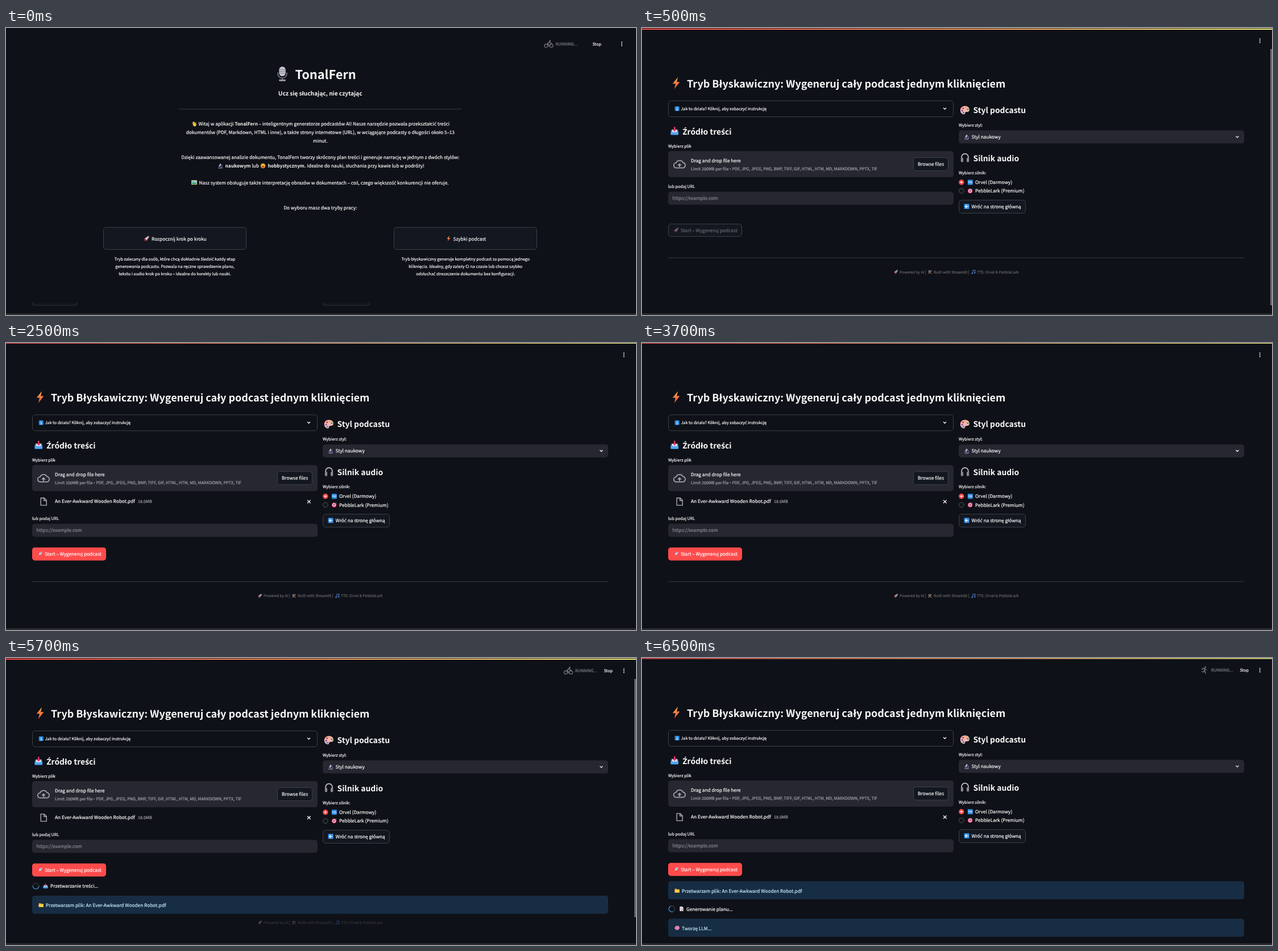
An HTML page for the animation above (8 s loop, 1108 by 506 pixels).

```html
<!DOCTYPE html>
<html lang="pl">
<head>
<meta charset="utf-8">
<title>Generator podcastów</title>
<style>
html, body { margin: 0; width: 100%; height: 100%; overflow: hidden; background: #0e1117; }
svg { display: block; width: 100%; height: 100%; }
text {
  font: 400 8.25px "Noto Sans CJK JP", "Noto Sans CJK SC", "Open Sans", "Noto Sans", sans-serif;
  color: #fafafa; fill: currentColor; stroke: currentColor; stroke-width: .2px;
  text-rendering: geometricPrecision; white-space: pre;
}
.o { font-family: "Open Sans", "Noto Sans", sans-serif; }
.b, .h1, .h2, .h3, .sub { font-weight: 700; stroke: none; }
.h1 { font-size: 21.7px; }
.h2 { font-size: 17.95px; }
.h3 { font-size: 13.85px; }
.sub { font-size: 10.1px; }
.s { font-size: 7.22px; }
.xs { font-size: 6.59px; color: #636468; }
.m { text-anchor: middle; }
.g { color: #a3a4a9; }
.ph { color: #8a8b90; }
.run { color: #7f8186; }
.off { color: #65676c; }
.note { color: #c7ebff; }
.line { fill: none; stroke: #fafafa; stroke-width: 1.3; }
.btn { fill: #131720; stroke: #3d4046; }
.frame { fill: none; stroke: #3d4046; }
.field { fill: #262730; }
.info { fill: #172d43; }
.red { fill: #ff4b4b; }

/* opaque scenes stack up, each one cutting in at its own time */
.scene { animation: 8s step-end infinite; }
#upload { animation-name: upload; }
#ready { animation-name: ready; }
#reading { animation-name: reading; }
#planning { animation-name: planning; }
@keyframes upload { 0% { visibility: hidden } 6.25%, to { visibility: visible } }
@keyframes ready { 0% { visibility: hidden } 31.25%, to { visibility: visible } }
@keyframes reading { 0% { visibility: hidden } 56.25%, to { visibility: visible } }
@keyframes planning { 0% { visibility: hidden } 81.25%, to { visibility: visible } }
</style>
</head>
<body>
<svg viewBox="0 0 1108 506"></svg>
<script>
const APP = 'TonalFern', FREE = 'Orvel', PAID = 'PebbleLark';
const FILE = 'An Ever-Awkward Wooden Robot.pdf';

// Icons live on a 20 x 20 grid
const icons = {
  bolt: '<path d="M13 0 4 11h5L7 20 16 8h-5z" fill="url(#fire)"/>',
  mic: `<rect x="5.6" y="0" width="8.8" height="13" rx="4.4" fill="#c8c4d0"/>
    <path d="M6 4h8M6 6.5h8M6 9h8" stroke="#8b8399" stroke-width=".9"/>
    <path d="M4 8v2a6 5.5 0 0 0 12 0V8M10 15.5V18" fill="none" stroke="#75707f" stroke-width="1.4"/>
    <rect x="5.5" y="17.5" width="9" height="2.3" rx="1" fill="#a19aad"/>`,
  inbox: `<path d="M3 6h14l2 5v7q0 1.5-1.5 1.5h-15Q1 19.5 1 18v-7z" fill="#2f86dd"/>
    <path d="M4 7h12v6H4z" fill="#dfe7f4"/><path d="M1 12h5l1.5 2h5L14 12h5v6H1z" fill="#55a9f2"/>
    <path d="M8.3 0h3.4v6H15l-5 5.5L5 6h3.3z" fill="#e9355a"/>`,
  palette: `<path d="M10 1C4 1 0 5 0 10.5S4.500 19 8 19c3 0 1.5-3 3-4.5s8 .5 8.5-5S15 1 10 1z" fill="#f2b8ae"/>
    <circle cx="6" cy="6" r="2" fill="#e2385a"/><circle cx="11.5" cy="4.5" r="1.9" fill="#f4a73b"/>
    <circle cx="16" cy="8" r="1.9" fill="#35a66b"/><circle cx="4" cy="11" r="1.9" fill="#7d4bc4"/>
    <circle cx="7" cy="15.5" r="1.9" fill="#3285e0"/>`,
  info: '<rect width="20" height="20" rx="3" fill="#2b8be6"/><path d="M7.5 8.5H11V16m-4 0h7M10 3v3" fill="none" stroke="#fff" stroke-width="2.2"/>',
  scope: `<path d="M9 1l5 3-5 9-5-3z" fill="#b9b5cb"/><path d="M13 7c6 3 5 9 0 11" fill="none" stroke="#7772a3" stroke-width="2.4"/>
    <path d="M2 13h9" stroke="#6ba4dd" stroke-width="2"/><path d="M2 18.5h16" stroke="#8f8aae" stroke-width="3"/>`,
  phones: `<path d="M3 13V9a7 7.5 0 0 1 14 0v4" fill="none" stroke="#c2bfca" stroke-width="2"/>
    <rect x="1.5" y="10" width="5" height="9" rx="2" fill="#8b8794"/><rect x="13.5" y="10" width="5" height="9" rx="2" fill="#8b8794"/>`,
  free: '<rect width="20" height="20" rx="3" fill="#2d8de8"/><path d="M3 13V7h3M3 10h2.5M8 13V7h2v3H8l2.5 3M15 7h-2.5v6H15m-2.5-3H15M18.5 7H17v6h1.5" fill="none" stroke="#fff" stroke-width="1.2"/>',
  dart: `<circle cx="9.5" cy="10.5" r="9.5" fill="#e3365b"/><circle cx="9.5" cy="10.5" r="6.5" fill="#f4e4ea"/>
    <circle cx="9.5" cy="10.5" r="4" fill="#e3365b"/><path d="M9.5 10.5 18 2" stroke="#4b9be8" stroke-width="2.4"/>`,
  back: '<rect width="20" height="20" rx="3" fill="#3392ea"/><path d="M17 10H5m5-5.5L4.5 10l5.5 5.5" fill="none" stroke="#fff" stroke-width="2.6"/>',
  rocket: `<path d="M7 7 2 9l-1 4 5-1zm6 6-2 5-4 1 1-5z" fill="#dc3d58"/>
    <path d="M19 1c-6 0-11 4-14 10l4 4c6-3 10-8 10-14z" fill="#d8d5e0"/><path d="M19 1l-5 .9L18.1 6z" fill="#e3415b"/>
    <circle cx="13" cy="7" r="2.1" fill="#4a93d4"/><path d="M5 13.5 1 19l5.5-4z" fill="#f9a63a"/>`,
  tools: `<path d="M3 17 15 5" stroke="#b9b7c0" stroke-width="3"/><path d="M6 6l11 12" stroke="#d98a58" stroke-width="3"/>
    <path d="M2 7l6-6 3 3-6 6z" fill="#9a98a5"/><path d="M13 2l1 4 4 1 1-4-3 1z" fill="#b9b7c0"/>`,
  tune: `<path d="M7 16V3l11-2v13M7 6l11-2" fill="none" stroke="#5c83d6" stroke-width="2.2"/>
    <circle cx="4.5" cy="16" r="3.5" fill="#5c83d6"/><circle cx="15.5" cy="14" r="3.5" fill="#5c83d6"/>`,
  wave: `<path d="M5 3l8 9M9 2l6 9M4 8l7 7M16 7v7" stroke="#ffc83d" stroke-width="3" stroke-linecap="round"/>
    <ellipse cx="12" cy="14" rx="6" ry="5.5" fill="#ffbd38"/><path d="M1 14l3 4M15 1l3 3" stroke="#4aa3e5" stroke-width="1.2"/>`,
  smile: `<circle cx="10" cy="10" r="9.5" fill="#ffb72e"/><path d="M5 8q1.5-2 3 0m4 0q1.5-2 3 0" fill="none" stroke="#60351d" stroke-width="1.4"/>
    <path d="M5 11.5h10a5 5 0 0 1-10 0z" fill="#8a2c34"/><circle cx="3.5" cy="11.5" r="2" fill="#f5734a"/><circle cx="16.5" cy="11.5" r="2" fill="#f5734a"/>`,
  photo: `<rect y="2" width="20" height="16" rx="1" fill="#e3bd72"/><path d="M2 4h16v12H2z" fill="#78c8ed"/>
    <path d="M2 13l5-5 4 4 3-2 4 3v3H2z" fill="#37a263"/><circle cx="14" cy="7" r="1.7" fill="#ffe36a"/>`,
  folder: '<path d="M1 3h7l2 2h9v13H1z" fill="#e79b23"/><path d="M1 7h18v11H1z" fill="#ffcd49"/>',
  memo: `<path d="M3 1h10l4 4v14H3z" fill="#ece8f2"/><path d="M5.5 6h6M5.5 9h8M5.5 12h5" stroke="#9b93ac" stroke-width="1.2"/>
    <path d="M8 17 17 8l2 2-9 9z" fill="#e8794b"/>`,
  brain: `<path d="M3 14C-1 11 1 6 4 5c1-4 6-5 8-3 4-1 7 3 7 6 2 4-1 7-4 7-1 4-4 5-5 2-3 1-6 0-7-3z" fill="#f187b4"/>
    <path d="M4 9q3-2 5 1m0-6q0 3 4 3m-6 7q4 1 5-2m3-3q-2 0-2 2" fill="none" stroke="#c24f86" stroke-width="1.3"/>`,
  bike: `<g fill="none" stroke="#7d7f84" stroke-width="1.4"><circle cx="4" cy="14" r="3.8"/><circle cx="16" cy="14" r="3.8"/>
    <path d="M10 16v-4L7 9l4-3.5L13.5 8H17" stroke-width="1.8"/></g><circle cx="13" cy="3.2" r="1.8" fill="#7d7f84"/>`,
  runner: `<path d="M4 9V6l5-1.5 2 .5-1.5 6 3 3v5.5M9.5 11 8 15l-5-1M11 5l2 3.5 4 1" fill="none" stroke="#7d7f84" stroke-width="2"/>
    <circle cx="13" cy="2" r="1.9" fill="#7d7f84"/>`,
  cloud: `<path d="M5.500 16.5H5A4 4 0 0 1 4.5 8.5 6 6 0 0 1 15.5 8 4.3 4.3 0 0 1 15.5 16.5z" fill="none" stroke="#a3a4a9" stroke-width="1.6"/>
    <path d="M10 9 6.5 12.5H9V15h2v-2.5h2.5z" fill="#a3a4a9"/>`,
  file: '<path d="M4 2h7.5l5 5v11H4zM11 2v5.5h5.5" fill="none" stroke="#b2b3b7" stroke-width="1.7"/>',
};

const icon = (name, cx, cy, size = 9, opacity = 1) =>
  `<g transform="translate(${cx - size / 2} ${cy - size / 2}) scale(${size / 20})" opacity="${opacity}">${icons[name]}</g>`;
// The CJK face lacks Polish letters and has full-width dashes and bullets
const text = (x, y, str, cls = '') =>
  `<text x="${x}" y="${y}" class="${cls}">${str.replace(/[–•ąćęłńśźżŹ]/g, '<tspan class="o">$&</tspan>')}</text>`;
const bold = str => `<tspan class="b">${str}</tspan>`;
const box = (x, y, w, h, cls) => `<rect x="${x}" y="${y}" width="${w}" height="${h}" rx="4.6" class="${cls}"/>`;
const rule = (x1, x2, y) => `<path d="M${x1} ${y}H${x2}" stroke="#383b41"/>`;
const chevron = (x, y) => `<path d="M${x - 2.5} ${y - 1.2}l2.5 2.5 2.5-2.5" class="line"/>`;
const lines = (x, y, step, cls, rows) => rows.map((row, i) => text(x, y + i * step, row, cls)).join('');
const dots = (x, y) => [-3, 0, 3].map(d => `<circle cx="${x}" cy="${y + d}" r="1" fill="#fafafa"/>`).join('');
const scene = (id, body) =>
  `<g class="scene" id="${id}"><rect width="1108" height="506" fill="#0e1117"/>${body}</g>`;

const status = (x, y, who, stopX) => icon(who, x, y, who == 'bike' ? 15.5 : 13)
  + text(x + 12, y + 2.8, 'RUNNING...', 's run') + text(stopX, y + 2.8, 'Stop', 's');
const spinner = (y, turn) => `<g transform="rotate(${turn} 52.5 ${y})" fill="none" stroke-width="1.5">
  <circle cx="52.5" cy="${y}" r="5.3" stroke="#32353c"/>
  <path d="M47.2 ${y}a5.3 5.3 0 0 0 10.6 0" stroke="#2b7fc9"/></g>`;
const busy = (y, turn, name, label) => spinner(y, turn) + icon(name, 69.5, y) + text(78, y + 3.3, label);
const notice = (y, name, label) =>
  box(46, y, 1013, 32, 'info') + icon(name, 61.7, y + 16.5) + text(70, y + 20, label, 'note');

const footer = (y, opacity = 1) => `<g opacity="${opacity}">`
  + icon('rocket', 446.5, y - 2.7, 8, .8) + text(453, y, 'Powered by AI |', 'xs')
  + icon('tools', 506.3, y - 2.7, 8, .8) + text(513, y, 'Built with Streamlit |', 'xs')
  + icon('tune', 582.8, y - 2.7, 8, .8) + text(589, y, `TTS: ${FREE} &amp; ${PAID}`, 'xs') + '</g>';

const home = () => status(954.5, 28.2, 'bike', 1031.5) + dots(1083, 28)
  + icon('mic', 486, 81, 26) + text(508.5, 89.5, APP, 'h1')
  + text(552.7, 119, 'Ucz się słuchając, nie czytając', 'sub m') + rule(304, 801, 143)
  + icon('wave', 331, 169.2)
  + text(338.5, 172.2, `Witaj w aplikacji ${bold(APP)} – inteligentnym generatorze podcastów AI! Nasze narzędzie pozwala przekształcić treści`)
  + lines(552.8, 187, 14.8, 'm', [
    'dokumentów (PDF, Markdown, HTML i inne), a także strony internetowe (URL), w wciągające podcasty o długości około 5–13',
    'minut.', '',
    `Dzięki zaawansowanej analizie dokumentu, ${APP} tworzy skrócony plan treści i generuje narrację w jednym z dwóch stylów:`])
  + icon('scope', 377, 243) + text(385.5, 246.2, `${bold('naukowym')} lub`)
  + icon('smile', 452, 243) + text(460.5, 246.2, `${bold('hobbystycznym.')} Idealne do nauki, słuchania przy kawie lub w podróży!`)
  + icon('photo', 331, 272.2, 10)
  + text(339.5, 275.7, 'Nasz system obsługuje także interpretację obrazów w dokumentach – coś, czego większość konkurencji nie oferuje.')
  + text(552.8, 320, 'Do wyboru masz dwa tryby pracy:', 'm')
  + box(171.5, 351.5, 251, 39, 'btn') + icon('rocket', 247.2, 371.3, 10) + text(256, 374.5, 'Rozpocznij krok po kroku')
  + box(682.5, 351.5, 251, 39, 'btn') + icon('bolt', 778.3, 371.3, 10) + text(786.5, 374.5, 'Szybki podcast')
  + lines(297, 409.7, 13, 's m', [
    'Tryb zalecany dla osób, które chcą dokładnie śledzić każdy etap',
    'generowania podcastu. Pozwala na ręczne sprawdzenie planu,',
    'tekstu i audio krok po kroku – idealne do korekty lub nauki.'])
  + lines(808.3, 409.7, 13, 's m', [
    'Tryb błyskawiczny generuje kompletny podcast za pomocą jednego',
    'kliknięcia. Idealny, gdy zależy Ci na czasie lub chcesz szybko',
    'odsłuchać streszczenie dokumentu bez konfiguracji.'])
  + [[46.5, 79], [557.5, 82]].map(([x, w]) =>
    `<path d="M${x} 484v1q0 4 4 4h${w - 8}q4 0 4-4v-1" fill="#12161e" stroke="#30333a"/>`).join('');

function page({ shift = 0, barTop = 1, barHeight = 2, barOpacity = 1, picked, thumb, extra }) {
  const url = picked ? 32 : 0, start = picked ? 362.2 : 345.2;
  return `<rect y="${barTop}" width="1108" height="${barHeight}" fill="url(#top)" opacity="${barOpacity}"/>`
    + `<g transform="translate(0 ${shift})">` + dots(1086.7, 22.5)
    + icon('bolt', 60, 97.3, 21) + text(79, 104.5, 'Tryb Błyskawiczny: Wygeneruj cały podcast jednym kliknięciem', 'h2')
    + box(46.5, 128.5, 501, 28, 'frame')
    + icon('info', 61.7, 142.3, 8) + text(68.5, 145.2, 'Jak to działa? Kliknij, aby zobaczyć instrukcję', 's') + chevron(532.5, 142)
    + icon('inbox', 57.3, 181.7, 15) + text(71.5, 187.5, 'Źródło treści', 'h3')
    + text(46, 211, 'Wybierz plik', 's') + box(46, 217, 502, 46, 'field')
    + icon('cloud', 66, 239.5, 22) + text(86, 237, 'Drag and drop file here')
    + text(86, 251, 'Limit 200MB per file • PDF, JPG, JPEG, PNG, BMP, TIFF, GIF, HTML, HTM, MD, MARKDOWN, PPTX, TIF', 's g')
    + box(477.5, 228.5, 61, 23, 'btn') + text(508, 243.2, 'Browse files', 'm')
    + (picked ? icon('file', 66, 281.5, 16) + text(86, 284.2, FILE) + text(232, 284.2, '18.0MB', 's g')
      + '<path d="M530 278.7l5.6 5.6m0-5.6l-5.6 5.6" class="line"/>' : '')
    + text(46, 282.2 + url, 'lub podaj URL', 's') + box(46, 288.6 + url, 502, 23, 'field')
    + text(53.5, 303.3 + url, 'https://example.com', 'ph')
    + (picked ? box(46, start, 130, 23, 'red') : box(46.5, start + .3, 129, 22, 'btn'))
    + icon('rocket', 60, start + 11.3, 9.5, picked ? 1 : .45)
    + text(68, start + 14.5, 'Start – Wygeneruj podcast', picked ? '' : 'off')
    + icon('palette', 568, 144.8, 16.5) + text(582.5, 150.3, 'Styl podcastu', 'h3')
    + text(557, 174, 'Wybierz styl:', 's') + box(557, 180.5, 502, 23, 'field')
    + icon('scope', 571, 192) + text(579.5, 195.3, 'Styl naukowy') + chevron(1047, 191.8)
    + icon('phones', 568, 228.8, 17) + text(582.5, 234.5, 'Silnik audio', 'h3')
    + text(557, 257.5, 'Wybierz silnik:', 's')
    + '<circle cx="561.8" cy="272" r="4.7" class="red"/><circle cx="561.8" cy="272" r="1.7" fill="#fafafa"/>'
    + icon('free', 577.3, 272) + text(586, 275.3, `${FREE} (Darmowy)`)
    + '<circle cx="561.8" cy="287.2" r="4.3" fill="#12151c" stroke="#53565c"/>'
    + icon('dart', 577.3, 287) + text(586, 290.4, `${PAID} (Premium)`)
    + box(557.5, 303.5, 117, 23, 'btn') + icon('back', 571, 314.6) + text(579.5, 318, 'Wróć na stronę główną')
    + extra + '</g>'
    + (thumb ? `<rect x="1105" y="37" width="3" height="${thumb - 37}" fill="#64666c"/>` : '');
}

const reading = `Przetwarzam plik: ${FILE}`;

document.querySelector('svg').innerHTML = `<defs>
  <linearGradient id="top"><stop stop-color="#ff4b4b"/><stop offset="1" stop-color="#fffd80"/></linearGradient>
  <linearGradient id="fire" x2="0" y2="1"><stop stop-color="#ffb04a"/><stop offset="1" stop-color="#f2453d"/></linearGradient>
</defs>`
  + scene('home', home())
  + scene('upload', page({ thumb: 489, extra: rule(46, 1059, 405.2) + footer(432.8) }))
  + scene('ready', page({
    shift: -1.8, barTop: 0, barHeight: 1, picked: true,
    extra: rule(46, 1059, 422.6) + footer(450.3),
  }))
  + scene('reading', page({
    picked: true, thumb: 457,
    extra: status(989, 22.5, 'bike', 1051.5) + busy(402, 0, 'inbox', 'Przetwarzanie treści...')
      + notice(419, 'folder', reading) + footer(469.3, .4),
  }))
  + scene('planning', page({
    shift: -1, barTop: 0, barOpacity: .7, picked: true,
    extra: status(989, 22.5, 'runner', 1051.5) + notice(394.5, 'folder', reading)
      + busy(443.3, 70, 'memo', 'Generowanie planu...') + notice(460.5, 'brain', 'Tworzę LLM...'),
  }))
  + '<rect y="503" width="1108" height="3" fill="#2a2b2e"/>';
</script>
</body>
</html>
```
